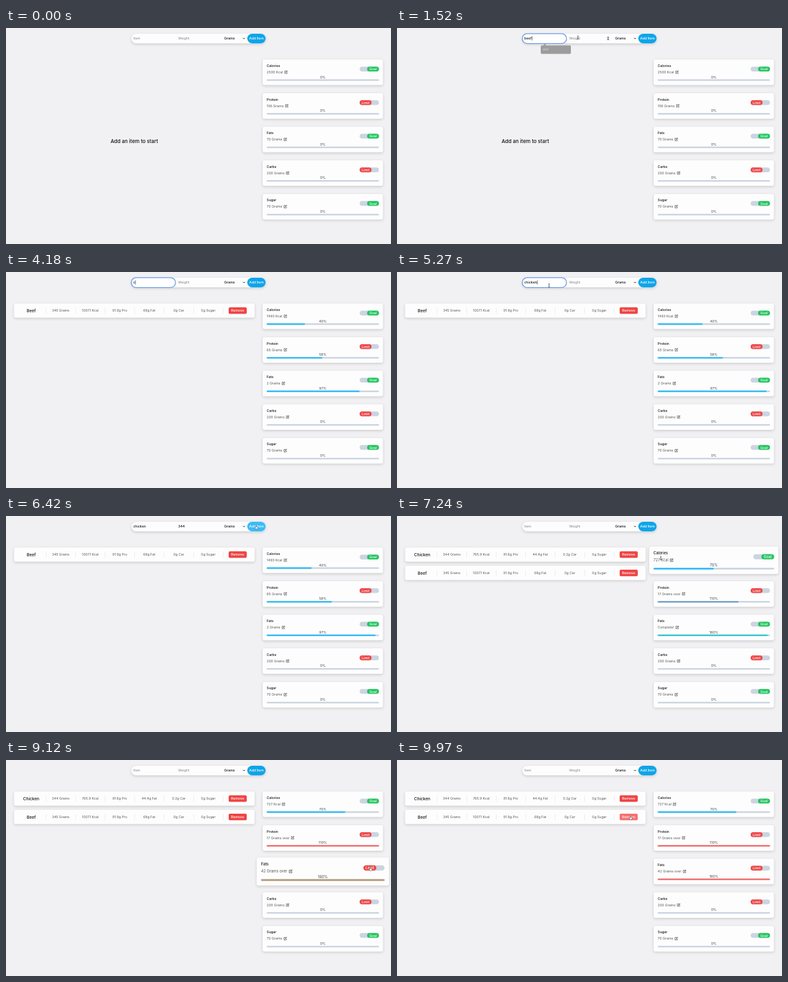
Animation, 600 px wide and 338 px high, one loop 10000 ms. Source, as an HTML page with a canvas:

```html
<!DOCTYPE html>
<html lang="en">
<head>
<meta charset="utf-8">
<title>Nutrition tracker</title>
<style>
html, body { margin: 0; width: 100%; height: 100%; overflow: hidden; background: #f1f0f2; }
canvas { display: block; }
</style>
</head>
<body>
<canvas id="stage" width="600" height="338"></canvas>
<script>
const ctx = document.getElementById('stage').getContext('2d');
const LOOP = 10000, FIRST_ADD = 3070, SECOND_ADD = 6810, TOGGLE = 8400, REMOVE_HOVER = 9800;
const SKY = [56, 189, 248], GREEN = [74, 222, 128], RED = [248, 113, 113];

// Each step: time, amount text, percent text, bar fraction, bar colour
const cards = [
  { name: 'Calories', goal: true, hover: [7170, 7400], steps: [
    [0, '2500 Kcal', '0%', 0, SKY], [FIRST_ADD, '1493 Kcal', '40%', .4, SKY], [SECOND_ADD, '727 Kcal', '70%', .7, SKY]] },
  { name: 'Protein', goal: false, hover: [7450, 7570], steps: [
    [0, '156 Grams', '0%', 0, SKY], [FIRST_ADD, '65 Grams', '58%', .58, SKY], [SECOND_ADD, '17 Grams over', '110%', 1, RED]] },
  { name: 'Fats', goal: true, hover: [7640, 9420], steps: [
    [0, '70 Grams', '0%', 0, SKY], [FIRST_ADD, '2 Grams', '97%', .97, SKY],
    [SECOND_ADD, 'Complete!', '160%', 1, GREEN], [TOGGLE, '42 Grams over', '160%', 1, RED]] },
  { name: 'Carbs', goal: false, steps: [[0, '200 Grams', '0%', 0, SKY]] },
  { name: 'Sugar', goal: true, steps: [[0, '70 Grams', '0%', 0, SKY]] }
];
const beef = ['Beef', '345 Grams', '1007.1 Kcal', '91.9g Pro', '68g Fat', '0g Car', '0g Sugar'];
const chicken = ['Chicken', '344 Grams', '765.9 Kcal', '81.6g Pro', '44.4g Fat', '0.2g Car', '0g Sugar'];

const entries = [
  { word: 'beef', weight: '345', focus: 600, typed: [760, 1220], next: 1600, weighed: [1750, 2100], submit: 2600, done: FIRST_ADD },
  { word: 'chicken', weight: '344', focus: 3400, typed: [4180, 5030], next: 5350, weighed: [5520, 5850], submit: 6250, done: SECOND_ADD }
];

// Pointer stops: time, x, y
const path = [
  [30, 0, 150], [580, 234, 17], [1250, 236, 18], [1500, 282, 15], [2150, 284, 16], [2480, 388, 17],
  [2850, 388, 17], [3190, 236, 20], [5270, 237, 21], [5420, 283, 16], [5850, 283, 16], [6150, 390, 17],
  [6980, 390, 18], [7240, 411, 66], [7800, 549, 170], [7950, 549, 171], [8300, 568, 170], [9250, 568, 170], [9860, 364, 90]
];

const clamp = x => Math.max(0, Math.min(1, x));
const mix = (a, b, k) => a + (b - a) * k;
const between = (t, [a, b]) => t >= a && t < b;
const rgb = c => `rgb(${c.map(Math.round)})`;

function bezier(x1, y1, x2, y2) {
  const curve = (a, b, s) => 3 * (1 - s) ** 2 * s * a + 3 * (1 - s) * s * s * b + s ** 3;
  return x => {
    let lo = 0, hi = 1;
    x = clamp(x);
    if (x === 0 || x === 1) return x;
    for (let i = 0; i < 20; i++) {
      const mid = (lo + hi) / 2;
      if (curve(x1, x2, mid) < x) lo = mid; else hi = mid;
    }
    return curve(y1, y2, lo);
  };
}
const ease = bezier(.25, .1, .25, 1);
const quick = bezier(.4, 0, .2, 1);

function box(x, y, w, h, r, fill) {
  ctx.beginPath();
  ctx.roundRect(x, y, w, h, r);
  ctx.fillStyle = fill;
  ctx.fill();
}

function panel(x, y, w, h, r) {
  ctx.save();
  ctx.shadowColor = 'rgba(0,0,0,.16)';
  ctx.shadowBlur = 4;
  ctx.shadowOffsetY = 1.4;
  box(x, y, w, h, r, '#fdfdfd');
  ctx.restore();
}

function text(str, x, y, { size = 5.3, color = '#111', weight = 500, align = 'left' } = {}) {
  ctx.font = `${weight} ${size}px Inter, sans-serif`;
  ctx.fillStyle = color;
  ctx.textAlign = align;
  ctx.fillText(str, x, y);
  return ctx.measureText(str).width;
}

function line(points, color, width) {
  ctx.beginPath();
  points.forEach(([x, y]) => ctx.lineTo(x, y));
  ctx.strokeStyle = color;
  ctx.lineWidth = width;
  ctx.stroke();
}

function shape(points, fill) {
  ctx.beginPath();
  points.forEach(([x, y]) => ctx.lineTo(x, y));
  ctx.closePath();
  ctx.fillStyle = fill;
  ctx.fill();
}

function editIcon(x, y) {
  line([[x + 2.6, y + .9], [x + .3, y + .9], [x + .3, y + 5], [x + 4.2, y + 5], [x + 4.2, y + 3]], '#555', .7);
  line([[x + 1.7, y + 3.5], [x + 4.6, y + .6]], '#555', 1.1);
}

function field(x, value, placeholder, focused) {
  if (focused) {
    box(x, 8.8, 69, 15.6, 7.8, '#fff');
    ctx.strokeStyle = '#699be5';
    ctx.lineWidth = 1.3;
    ctx.stroke();
  }
  const width = text(value || placeholder, x + 3, 18.3, value ? {} : { color: '#858585', weight: 400 });
  if (focused) box(x + 3.3 + (value ? width : 0), 13, .6, 6.4, 0, '#222');
}

function drawForm(t) {
  const entry = entries.find(e => between(t, [e.focus, e.done]));
  const typed = (str, [a, b]) => t < a ? '' : str.slice(0, 1 + Math.floor((str.length - 1) * clamp((t - a) / (b - a))));
  const word = entry ? typed(entry.word, entry.typed) : '';
  const weight = entry ? typed(entry.weight, entry.weighed) : '';
  const onItem = entry && t < entry.next;
  const onWeight = entry && between(t, [entry.next, entry.submit]);

  panel(195.3, 9, 209.3, 15, 7.5);
  field(195.2, word, 'Item', onItem);
  field(265.2, weight, 'Weight', onWeight);
  if (onWeight || between(t, [1420, 2300])) {
    box(327, 12.8, 4, 7, 1, '#e8e8e8');
    shape([[327.6, 15.6], [329, 13.6], [330.4, 15.6]], '#444');
    shape([[327.6, 17], [329, 19], [330.4, 17]], '#444');
  }
  text('Grams', 340, 18.3);
  line([[369.3, 15.6], [370.8, 17.1], [372.3, 15.6]], '#111', .9);
  const hot = between(t, [2420, 2910]) || between(t, [6090, 7050]);
  box(376, 9, 28.6, 15, 7.5, hot ? '#38bdf8' : '#0ea5e9');
  text('Add Item', 390.3, 18.3, { color: '#fff', align: 'center' });

  if (between(t, [800, 1600])) {
    box(224, 27.2, 47, 13.2, 1.6, '#9c9c9c');
    shape([[227.5, 27.5], [230.2, 24.6], [233, 27.5]], '#9c9c9c');
    text('beef', 227.5, 35.3, { size: 4, color: '#dedede', weight: 400 });
  }
}

function drawRow(cells, y, hot) {
  panel(12.5, y, 375, 22.2, 3);
  cells.forEach((cell, i) => {
    const x = 39.3 + 46 * i;
    text(cell, x, y + (i ? 13 : 13.5), { size: i ? 5.2 : 6.4, color: i ? '#555' : '#111', weight: i ? 400 : 500, align: 'center' });
    box(x + 23, y + 6.5, .6, 9.5, 0, '#e2e4e8');
  });
  box(347, y + 6, 28.2, 10.2, 2, rgb([mix(239, 248, hot), mix(68, 113, hot), mix(68, 113, hot)]));
  text('Remove', 361, y + 13, { color: '#fff', align: 'center' });
}

function drawCard(card, index, t) {
  const y = 49.3 + 52.6 * index;
  const [enter, leave] = card.hover || [LOOP, LOOP];
  const lift = quick((t - enter) / 150) - quick((t - leave) / 150);
  let label, percent, fill = 0, color = SKY;
  for (const [start, amount, pct, target, hue] of card.steps) {
    if (t < start) break;
    const k = ease((t - start) / 2000);
    label = amount;
    percent = pct;
    fill = mix(fill, target, k);
    color = color.map((c, i) => mix(c, hue[i], k));
  }
  const flip = card.name === 'Fats' ? quick((t - TOGGLE) / 150) : 0;
  const goal = card.goal ? 1 - flip : 0;

  ctx.save();
  ctx.translate(493.75, y + 20);
  ctx.scale(1 + .1 * lift, 1 + .1 * lift);
  ctx.translate(-493.75, -20);
  panel(400, 0, 187.5, 40, 3);
  text(card.name, 406.3, 11.6);
  const width = text(label, 406.3, 21.7, { color: '#555', weight: 400 });
  editIcon(408.8 + width, 16.9);
  text(percent, 493.75, 29.2, { color: '#444', weight: 400, align: 'center' });
  box(406.3, 31, 175, 2.5, 1.25, '#cbd5e1');
  if (fill) box(406.3, 31, 175 * fill, 2.5, 1.25, rgb(color));
  box(551.2, 11.1, 30, 7.5, 3.75, '#cbd5e1');
  const x = mix(551.2, 562.8, goal);
  box(x, 11.1, 18.4, 7.5, 3.75, goal > .5 ? '#22c55e' : '#ef4444');
  text(goal > .5 ? 'Goal' : 'Limit', x + 9.2, 16.8, { color: '#fff', align: 'center' });
  ctx.restore();
}

function pointerAt(t) {
  const next = path.findIndex(stop => stop[0] > t);
  if (next < 0) return path[path.length - 1].slice(1);
  const [t0, x0, y0] = path[next - 1], [t1, x1, y1] = path[next];
  const u = (t - t0) / (t1 - t0), k = u * u * (3 - 2 * u);
  return [mix(x0, x1, k), mix(y0, y1, k)];
}

function drawPointer(t) {
  const typing = entries.some(e => between(t, [e.typed[0], e.typed[1] + 60]) || between(t, e.weighed));
  if (t < 30 || typing) return;
  const [x, y] = pointerAt(t);
  const inField = y > 9 && y < 24 && x > 195 && x < 334;
  const onAmount = x > 400 && x < 425 && y > 60 && y < 73;
  const onButton = (y > 9 && y < 24 && x > 376 && x < 405) || t > REMOVE_HOVER || (x > 555 && y > 160 && y < 178);
  ctx.save();
  ctx.translate(x, y);
  ctx.lineJoin = 'round';
  if (inField || onAmount) {
    line([[-1.2, -2.6], [0, -2.1], [1.2, -2.6]], '#222', .6);
    line([[0, -2.1], [0, 2.2]], '#222', .7);
    line([[-1.2, 2.7], [0, 2.2], [1.2, 2.7]], '#222', .6);
  } else {
    const outline = onButton
      ? [[-.7, -2.4], [.2, -2.4], [.4, -.5], [2.4, .1], [2.2, 2], [1.4, 3.3], [-.8, 3.3], [-2.3, .9], [-1.7, .4], [-.7, 1.1]]
      : [[0, -2.2], [0, 2.8], [1.1, 1.8], [1.9, 3.5], [2.7, 3.1], [1.9, 1.5], [3.4, 1.4]];
    const dark = !onButton;
    shape(outline, dark ? '#222' : '#fff');
    line([...outline, outline[0]], dark ? '#fff' : '#333', .5);
    if (dark) shape(outline, '#222');
  }
  ctx.restore();
}

function draw(t) {
  ctx.fillStyle = '#f1f0f2';
  ctx.fillRect(0, 0, 600, 338);
  drawForm(t);
  const hot = quick((t - REMOVE_HOVER) / 150);
  if (t < FIRST_ADD) text('Add an item to start', 200, 180, { size: 7.9, align: 'center' });
  else if (t < SECOND_ADD) drawRow(beef, 49.3, 0);
  else {
    drawRow(chicken, 49.3, 0);
    drawRow(beef, 78, hot);
  }
  cards.forEach((card, i) => drawCard(card, i, t));
  drawPointer(t);
}

const begin = performance.now();
function tick() {
  draw((performance.now() - begin) % LOOP);
  requestAnimationFrame(tick);
}
tick();
</script>
</body>
</html>
```
